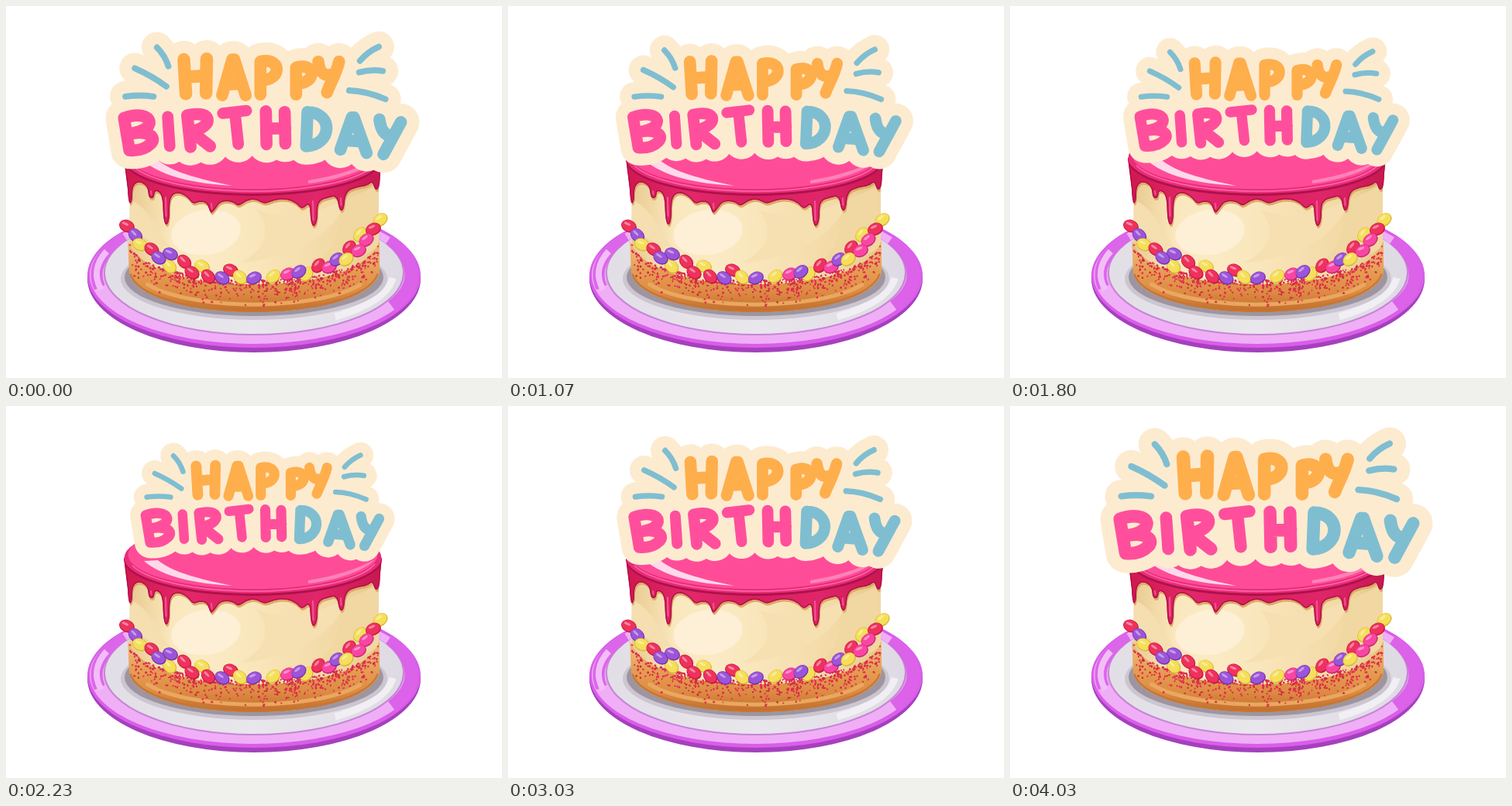
Recreate the animation shown at these times as an HTML page with a canvas. Size 640 by 480 pixels, loop 4060 ms.

```html
<!DOCTYPE html>
<html lang="en">
<head>
<meta charset="utf-8">
<title>Happy Birthday</title>
<style>
html, body { margin: 0; width: 100%; height: 100%; overflow: hidden; background: #fff; }
canvas { display: block; width: 640px; height: 480px; }
</style>
</head>
<body>
<canvas id="stage" width="640" height="480" role="img" aria-label="Happy Birthday cake"></canvas>
<script>
const LOOP = 4060, FRAME = 100 / 3, TAU = Math.PI * 2;
const FULL = 467, PIVOT = [330.5, 122];

// Sign width over time
const KEYS = [
  [0, 405], [250, 467], [570, 390], [630, 372], [870, 321], [1080, 388],
  [1435, 467], [1625, 423], [2040, 321], [2230, 341], [2685, 467], [3030, 382],
  [3330, 321], [3670, 397], [3730, 419], [3890, 467], [4030, 429]
];

const secant = i => (KEYS[i + 1][1] - KEYS[i][1]) / (KEYS[i + 1][0] - KEYS[i][0]);

function slope(i) {
  if (i === 0) return secant(0) * 1.4;
  if (i === KEYS.length - 1) return secant(i - 1) * 1.4;
  const a = secant(i - 1), b = secant(i);
  return a * b <= 0 ? 0 : 2 * a * b / (a + b);
}

function signWidth(t) {
  const end = KEYS[KEYS.length - 1];
  if (t >= end[0]) return end[1];
  const i = KEYS.findIndex((k, n) => t < KEYS[n + 1][0]);
  const [t0, w0] = KEYS[i], [t1, w1] = KEYS[i + 1];
  const h = t1 - t0, u = (t - t0) / h, v = 1 - u;
  return v * v * (1 + 2 * u) * w0 + u * u * (3 - 2 * u) * w1
    + h * u * v * (v * slope(i) - u * slope(i + 1));
}

function ellipse(g, x, y, rx, ry, fill, turn = 0) {
  g.beginPath();
  g.ellipse(x, y, rx, ry, turn, 0, TAU);
  g.fillStyle = fill;
  g.fill();
}

function arc(g, x, y, rx, ry, from, to, color, width) {
  g.beginPath();
  g.ellipse(x, y, rx, ry, 0, from, to);
  g.strokeStyle = color;
  g.lineWidth = width;
  g.stroke();
}

function fillPath(g, d, fill) {
  g.fillStyle = fill;
  g.fill(new Path2D(d));
}

function ramp(g, x0, y0, x1, y1, ...colors) {
  const r = g.createLinearGradient(x0, y0, x1, y1);
  colors.forEach((c, i) => r.addColorStop(i / (colors.length - 1), c));
  return r;
}

function seeded(s) {
  return () => (s = (s * 16807) % 2147483647) / 2147483647;
}

function drawPlate(g) {
  ellipse(g, 320, 352, 215, 95, '#a640bd');
  ellipse(g, 320, 348, 215, 93, '#d95ee9');
  ellipse(g, 319, 347, 211, 89, '#f0aef6');
  g.lineCap = 'butt';
  arc(g, 320, 347, 203, 85, -0.55, 0.5, '#db62e9', 17);
  arc(g, 320, 347, 203, 85, 2.95, 3.75, '#dc66ea', 15);
  arc(g, 320, 346, 203, 84, 2.9, 3.5, '#f3bdf8', 8);
  ellipse(g, 320, 345, 194, 80, '#c785d6');
  ellipse(g, 320, 344, 192, 79, ramp(g, 128, 0, 512, 0, '#e2dee6', '#e9e6ec', '#dedae3'));
  arc(g, 320, 344, 180, 70, 0.1, 0.95, '#f2eff4', 9);
  ellipse(g, 320, 352, 172, 53, '#cbc6cf');
  ellipse(g, 320, 350, 167, 50, '#9e95a0');
}

const BODY = 'M160 215 L159 340 C164 375 235 395 320 395 S475 375 481 340 L481 215 Z';
const CRUST = 'M157 302 L159 344 C166 376 235 395 320 395 S474 376 482 344 L482 302 '
  + 'C470 340 405 359 320 359 S170 340 157 302 Z';

function drawBody(g) {
  fillPath(g, BODY, ramp(g, 160, 0, 481, 0,
    '#e9ca91', '#fae7bd', '#fbeac4', '#f9e6bb', '#f6dfb0', '#f2d9a5', '#e6c587'));
  g.save();
  g.clip(new Path2D(BODY));
  fillPath(g, 'M160 250 C185 260 196 290 212 312 C180 305 165 290 160 280 Z', '#f5deaf');
  ellipse(g, 258, 292, 45, 29, '#fdf0d6', -0.15);
  fillPath(g, 'M322 262 C360 278 400 268 440 248 C425 295 370 327 302 331 C337 315 344 286 322 262 Z', '#f6e0b1');
  fillPath(g, 'M430 255 C450 242 472 238 481 228 L481 310 C455 330 425 334 390 339 C426 318 436 285 430 255 Z', '#f1d7a2');
  g.restore();
  fillPath(g, CRUST, ramp(g, 0, 315, 0, 396, '#edb774', '#e59d52', '#dd8b43', '#bf6c2b'));
  g.lineCap = 'round';
  arc(g, 320, 340, 152, 45, 0.45, 2.7, '#eaa75f', 5);
  arc(g, 320, 341, 160, 53, 0.1, 3.04, '#c77631', 2);
}

function drawSprinkles(g) {
  const rnd = seeded(71);
  for (let i = 0; i < 620; i++) {
    const k = rnd() * 2 - 1, drop = rnd() * rnd();
    const x = 320 + k * 160;
    const y = 306 + 48 * Math.sqrt(1 - k * k) + drop * 35;
    ellipse(g, x, y, 0.9 + rnd() * 0.8, 0.8 + rnd() * 0.7, rnd() < 0.75 ? '#e32b4f' : '#c92a42', rnd() * 3);
  }
}

const HUES = {
  r: ['#ef315d', '#bd1741'], p: ['#9c55d8', '#7132ae'],
  y: ['#f5df58', '#d9b638'], k: ['#f846a2', '#c92378']
};
const CANDIES = 'r156,284 y483,276 y457,295 r474,288 k465,302 p167,296 y173,308 r188,314 '
  + 'y211,336 p212,320 p197,325 r230,330 y253,336 r240,344 r261,349 r290,341 p279,351 '
  + 'y302,350 p320,351 y345,349 y388,346 k364,346 p378,343 r403,335 k417,337 p427,327 '
  + 'r443,312 k455,316 y439,327';

function drawCandies(g) {
  CANDIES.split(' ').forEach((c, i) => {
    const [x, y] = c.slice(1).split(',').map(Number);
    const [fill, edge] = HUES[c[0]];
    const turn = x < 320 ? 0.4 + (i % 3) * 0.2 : -0.4 - (i % 3) * 0.25;
    ellipse(g, x, y, 10.3, 8, edge, turn);
    ellipse(g, x - 0.3, y - 0.5, 9.4, 7, fill, turn);
    ellipse(g, x - 2, y - 3, 4.5, 1.6, 'rgba(255,255,255,.42)', turn);
  });
}

const DRIPS = [
  157,236, 158,256, 163,253, 163,232, 172,226, 183,233, 184,248, 191,248, 192,237,
  202,243, 203,276, 207,284, 211,276, 211,246, 222,240, 235,247, 241,256, 250,252,
  260,254, 264,269, 270,262, 277,252, 292,252, 300,259, 310,251, 322,249, 334,256,
  346,250, 362,249, 374,254, 382,263, 392,253, 393,278, 397,286, 402,277, 402,252,
  416,247, 427,245, 430,264, 436,264, 438,240, 452,234, 466,232, 473,226, 476,238,
  482,235, 483,212
];

function icingPath() {
  const p = new Path2D('M152 196');
  p.lineTo(DRIPS[0], DRIPS[1]);
  for (let i = 2; i < DRIPS.length - 2; i += 2) {
    const [x, y, nx, ny] = DRIPS.slice(i, i + 4);
    p.quadraticCurveTo(x, y, (x + nx) / 2, (y + ny) / 2);
  }
  p.lineTo(483, 215);
  p.lineTo(485, 196);
  p.closePath();
  return p;
}

function drawIcing(g) {
  const icing = icingPath();
  g.save();
  g.clip(new Path2D(BODY));
  g.translate(1, 3);
  g.fillStyle = '#dcaa68';
  g.fill(icing);
  g.restore();

  g.fillStyle = ramp(g, 152, 0, 485, 0, '#cf174f', '#e2286a', '#d91f5e', '#e0266a', '#c71750');
  g.fill(icing);
  g.save();
  g.clip(icing);
  g.strokeStyle = '#b3124a';
  g.lineWidth = 3;
  g.stroke(icing);
  g.lineCap = 'round';
  for (const [x, y, h] of [[187, 239, 4], [206, 247, 24], [265, 255, 6], [396, 252, 24], [432, 248, 9]]) {
    g.strokeStyle = '#f3568f';
    g.lineWidth = 2;
    g.beginPath();
    g.moveTo(x, y);
    g.lineTo(x + 0.5, y + h);
    g.stroke();
  }
  g.restore();

  ellipse(g, 318.5, 199, 166, 46, '#ad124b');
  ellipse(g, 318.5, 196, 166, 46, '#ea2c79');
  ellipse(g, 318.5, 192, 161, 44, '#ff4c98');
  arc(g, 318.5, 193, 162, 46, 0.25, 2.85, '#ff6aaa', 1.5);
  fillPath(g, 'M178 200 C200 219 240 229 292 232 C248 223 214 214 196 199 Z', '#ffd9ea');
  fillPath(g, 'M390 229 C430 224 463 212 476 198 C454 210 427 219 390 225 Z', '#ff83b9');
}

function makeCake() {
  const c = document.createElement('canvas');
  c.width = 640;
  c.height = 480;
  const g = c.getContext('2d');
  drawPlate(g);
  drawBody(g);
  drawSprinkles(g);
  drawIcing(g);
  drawCandies(g);
  return c;
}

// Brush lettering: colour, stroke width, path
const ORANGE = '#ffae4c', PINK = '#ff4f9c', TEAL = '#7fbed1', CREAM = '#fdebd0';
const STROKES = [
  [ORANGE, 19, 'M214 61 L217 112 M248 60 L247 111 M217 87 L247 85'],
  [ORANGE, 18, 'M271 114 L286 61 L289 61 L306 114 M278 98 L300 97'],
  [ORANGE, 18, 'M328 64 L328 113 M328 64 C360 57 360 92 329 92'],
  [ORANGE, 18, 'M381 73 L381 113 M381 73 C410 64 413 97 381 97'],
  [ORANGE, 18, 'M414 64 C416 82 424 86 434 83 M445 64 C441 82 431 98 427 110'],
  [PINK, 18, 'M125 148 L133 196 M125 148 C150 139 169 147 161 160 C155 168 143 170 131 172 '
    + 'C162 165 174 177 165 186 C157 194 145 197 133 196'],
  [PINK, 17, 'M190 146 L193 190'],
  [PINK, 18, 'M219 144 L224 191 M219 144 C257 135 260 161 225 168 L253 190'],
  [PINK, 17, 'M272 141 L307 137 M290 140 L295 187'],
  [PINK, 18, 'M336 138 L337 187 M364 139 L365 186 M337 164 L365 163'],
  [TEAL, 18, 'M398 139 L396 190 M398 139 C437 140 435 188 396 190'],
  [TEAL, 18, 'M447 195 L464 147 L467 147 L486 200 M455 181 L479 183'],
  [TEAL, 18, 'M505 150 C507 166 513 175 524 174 M537 154 L511 202']
];
const RAYS = [
  [174, 43, 191, 71, -4], [141, 74, 188, 101, -3], [127, 116, 169, 116, -3],
  [504, 42, 476, 63, 4], [475, 80, 510, 78, 4], [460, 107, 514, 120, 6]
];

function rayPath([x0, y0, x1, y1, bend]) {
  const d = Math.hypot(x1 - x0, y1 - y0);
  const mx = (x0 + x1) / 2 - (y1 - y0) / d * bend;
  const my = (y0 + y1) / 2 - Math.abs(x1 - x0) / d * Math.abs(bend);
  return `M${x0} ${y0} Q${mx} ${my} ${x1} ${y1}`;
}

const marks = [...STROKES, ...RAYS.map(r => [TEAL, 9, rayPath(r)])]
  .map(([color, width, d]) => ({ color, width, path: new Path2D(d) }));
const core = new Path2D('M150 110 L215 62 L450 62 L500 112 L525 170 L480 190 L145 190 Z');

function drawSign(g, scale) {
  g.save();
  g.translate(...PIVOT);
  g.scale(scale, scale);
  g.translate(-PIVOT[0], -PIVOT[1]);
  g.lineCap = g.lineJoin = 'round';
  g.fillStyle = g.strokeStyle = CREAM;
  g.fill(core);
  for (const m of marks) {
    g.lineWidth = m.width + 37;
    g.stroke(m.path);
  }
  for (const m of marks) {
    g.strokeStyle = m.color;
    g.lineWidth = m.width;
    g.stroke(m.path);
  }
  g.restore();
}

const ctx = document.getElementById('stage').getContext('2d');
const cake = makeCake();

function draw() {
  const t = performance.now() % LOOP;
  const step = Math.floor((t + 4) / FRAME) * FRAME;
  ctx.fillStyle = '#fff';
  ctx.fillRect(0, 0, 640, 480);
  ctx.drawImage(cake, 0, 0);
  drawSign(ctx, signWidth(step) / FULL);
  requestAnimationFrame(draw);
}
draw();
</script>
</body>
</html>
```
